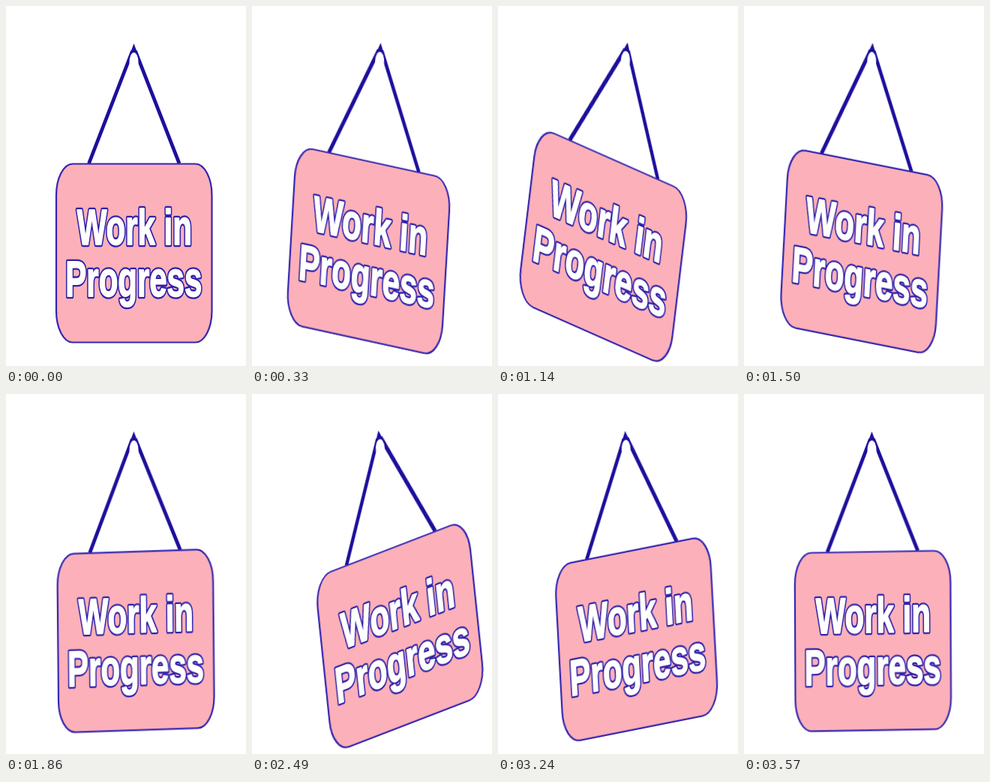
Recreate the animation shown at these times as an HTML page. Size 320x480 px, loop 3.6 s.

```html
<!DOCTYPE html>
<html lang="en">
<head>
<meta charset="utf-8">
<title>Work in Progress</title>
<style>
  html, body { margin: 0; width: 100%; height: 100%; overflow: hidden; background: #fff; }
  svg { display: block; width: 320px; height: 480px; }

  .swing { animation: swing 3600ms steps(30, end) infinite; }
  @keyframes swing {
    0%, 50%, 100% { transform: translateY(0) rotate(0deg); }
    25% { transform: translateY(-1.3px) rotate(17.7deg); }
    75% { transform: translateY(-1.1px) rotate(-14.8deg); }
  }

  .rope { fill: none; stroke: #1d0f9c; stroke-width: 4.8; }
  .knot { fill: #1d0f9c; }
  .gap { fill: #fff; }
  .board { fill: #fcb0b9; stroke: #3325b0; stroke-width: 2.2; }
  .label {
    font: bold 42px "Liberation Sans", Arial, sans-serif;
    text-anchor: middle;
    fill: #fff;
    stroke-linejoin: round;
  }
  .outline { stroke: #2f21aa; stroke-width: 4.2; }
  .face { stroke: #fff; stroke-width: 1.2; }
</style>
</head>
<body>
<svg viewBox="0 0 320 480">
  <defs>
    <g id="label" class="label">
      <text transform="translate(171.3 318) scale(1 1.6)">Work in</text>
      <text transform="translate(170.3 387) scale(1 1.6)">Progress</text>
    </g>
  </defs>
  <!-- The sign turns in an unstretched space, then is stretched vertically -->
  <g transform="translate(170.5 70) scale(1 1.92)">
    <g class="swing">
      <g transform="scale(1 .5208) translate(-170.5 -70)">
        <path class="rope" d="M110.5 210 L168.5 60 M231 210 L172.5 60"/>
        <path class="knot" d="M170.5 50 L178 70 H163 Z"/>
        <ellipse class="gap" cx="170.5" cy="75" rx="6" ry="13"/>
        <rect class="board" x="67" y="210.5" width="207.5" height="238" rx="22" ry="42"/>
        <use href="#label" class="outline"/>
        <use href="#label" class="face"/>
      </g>
    </g>
  </g>
</svg>
</body>
</html>
```
